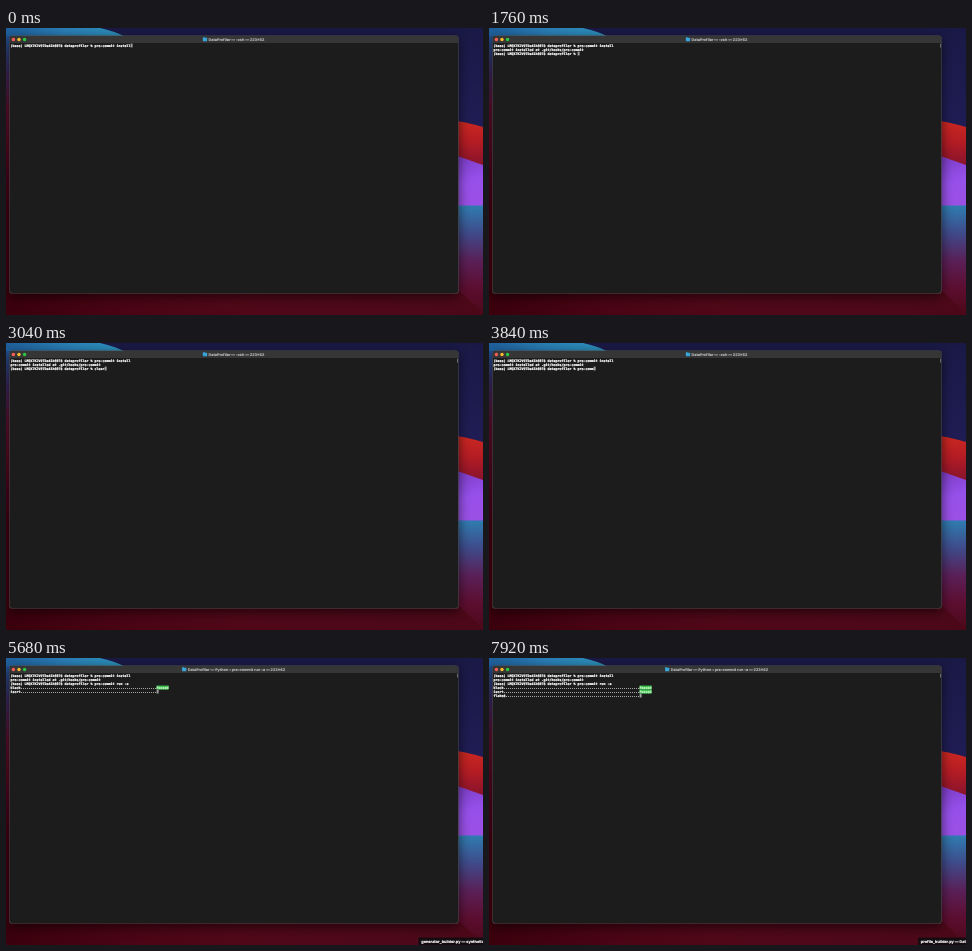
Animation, 477 px wide and 287 px high, one loop 8000 ms. Source, as an HTML page with a canvas:

```html
<!DOCTYPE html>
<html lang="en">
<head>
<meta charset="utf-8">
<title>Terminal</title>
<style>
html, body { margin: 0; width: 100%; height: 100%; overflow: hidden; background: #1c1a4a; }
canvas { display: block; width: 477px; height: 287px; }
</style>
</head>
<body>
<canvas id="stage" width="477" height="287"></canvas>
<script>
const ctx = document.getElementById('stage').getContext('2d');
const LOOP = 8000, COL = 2, ROW = 4.02, LEFT = 4.6, TOP = 15.5;
const PROMPT = '(base) LMQX7K2V9TDa41h6078 dataprofiler % ';
const MONO = 'bold 10px "DejaVu Sans Mono", monospace';
const SANS = '700 10px Inter, sans-serif';

function fade(x0, y0, x1, y1, ...colors) {
  const g = ctx.createLinearGradient(x0, y0, x1, y1);
  colors.forEach((c, i) => g.addColorStop(i / (colors.length - 1), c));
  return g;
}

function shape(path, fill) {
  ctx.fillStyle = fill;
  ctx.fill(new Path2D(path));
}

function box(x, y, w, h, r, fill) {
  ctx.fillStyle = fill;
  ctx.beginPath();
  ctx.roundRect(x, y, w, h, r);
  ctx.fill();
}

// Tiny type: set at 10px and scaled down so that advances stay fractional.
function text(str, x, y, size, font, fill, weight = 0) {
  ctx.save();
  ctx.translate(x, y);
  ctx.scale(size / 10, size / 10);
  ctx.font = font;
  ctx.textRendering = 'geometricPrecision';
  ctx.fillStyle = ctx.strokeStyle = fill;
  ctx.fillText(str, 0, 0);
  if (weight) {
    ctx.lineWidth = weight;
    ctx.strokeText(str, 0, 0);
  }
  ctx.restore();
}

const mono = (str, x, y, fill) => text(str, x, y + 3.2, 3.322, MONO, fill, .7);

function widthOf(str, size) {
  ctx.font = SANS;
  return ctx.measureText(str).width * size / 10;
}

function wallpaper() {
  box(0, 0, 477, 287, 0, fade(0, 0, 0, 110, '#1a1946', '#201d56'));
  shape('M0 0H94Q108 3 120 9V30H0Z', fade(0, 0, 120, 0, '#1f5f9c', '#2a80b8', '#2c93bc'));
  shape('M0 8H8V287H0Z', fade(0, 8, 0, 180, '#20508f', '#38265c', '#56102e', '#560a20', '#48041a', '#420012'));
  shape('M440 91Q460 94 477 99V150H440Z', fade(0, 92, 0, 136, '#cc2820', '#b41c24', '#8a142c'));
  shape('M440 124Q460 131 477 137V180H440Z', fade(452, 128, 470, 180, '#7a3cc4', '#9650ea', '#9c50e4'));
  shape('M440 177.5H477V287H440Z', fade(0, 178, 0, 287, '#2f7cb0', '#3f4a8a', '#5a2058', '#5c0e30', '#4c0818'));
  shape('M0 262H452Q466 274 477 287H0Z', fade(0, 0, 477, 0, '#3a000c', '#4a0414', '#500818', '#4e081a', '#4c0818'));
}

function windowFrame(title) {
  ctx.save();
  ctx.shadowColor = 'rgba(0,0,0,.6)';
  ctx.shadowBlur = 12;
  ctx.shadowOffsetY = 3;
  box(3.4, 7.6, 449.2, 258, 2.6, '#505050');
  ctx.restore();
  box(3.9, 8.1, 448.2, 257, 2.3, '#1c1c1c');
  box(3.9, 8.1, 448.2, 7, [2.3, 2.3, 0, 0], '#363636');
  ['#ff5f57', '#febc2e', '#28c840'].forEach((c, i) =>
    box(5.7 + i * 5.6, 9.8, 3.4, 3.4, 1.7, c));

  const size = 3.75, x = 230.4 - widthOf(title, size) / 2;
  box(x - 5.6, 9.2, 1.9, 1.5, .4, '#2b9fd6');
  box(x - 5.6, 9.7, 4.2, 3.5, .5, '#3aa5d8');
  text(title, x, 12.7, size, SANS, '#b8b8b8', .3);
}

const typed = (str, t, start, end) =>
  str.slice(0, Math.max(0, Math.round(str.length * Math.min(1, (t - start) / (end - start)))));

const hook = name => name.padEnd(73, '.');

function screenLines(t) {
  const lines = [PROMPT + 'pre-commit install'];
  if (t >= 560) lines.push('');
  if (t < 960) return lines;
  lines[1] = 'pre-commit installed at .git/hooks/pre-commit';

  let cmd = typed('clear', t, 2480, 2960);
  if (t >= 3200) cmd = 'clear'.slice(0, Math.max(0, 5 - Math.floor((t - 3200) / 60)));
  if (t >= 3520) cmd = typed('pre-commit run -a', t, 3520, 4200);
  lines.push(PROMPT + cmd);

  if (t >= 4320) lines.push('');
  if (t >= 4480) lines[3] = hook('black');
  if (t >= 5360) lines.push(hook('isort'));
  if (t >= 5920) lines.push(hook('flake8'));
  return lines;
}

function terminal(t) {
  const lines = screenLines(t);
  const last = lines.length - 1;
  if (last) box(451, 15.8, .7, 3.6, 0, '#909090');
  lines.forEach((line, i) => {
    const y = TOP + i * ROW;
    mono(line, LEFT, y, '#fff');
    if (i > 2 && i < last) {
      const x = LEFT + 73 * COL;
      box(x, y, 6 * COL, ROW, 0, '#3cc24c');
      mono('Passed', x, y, '#c4f4c8');
    }
  });
  box(LEFT + lines[last].length * COL, TOP + last * ROW + .1, COL, ROW - .2, 0, '#a0a0a0');
}

function pointer(t) {
  if (t < 4560 || t > 5000) return;
  const k = Math.max(0, (t - 4680) / 320) ** 2;
  const x = 427.5 + 18 * k, y = 145.5 + 145 * k;
  if (y > 265) return;
  ctx.lineWidth = .9;
  ctx.strokeStyle = '#f0f0f0';
  ctx.stroke(new Path2D(`M${x - 1.3} ${y - 2.6}h2.6m-1.3 0v5.2m-1.3 0h2.6`));
}

function dockLabel(t) {
  if (t < 5040) return;
  const [str, x] = t < 6000
    ? ['generator_builder.py — synthetic', 415.2]
    : ['profile_builder.py — DataProfiler', 431.8];
  box(x - 2.8, 279.4, 80, 9, 1.2, '#140c10');
  text(str, x, 284.7, 3.85, SANS, '#fff', .4);
}

function draw(now) {
  const t = now % LOOP;
  wallpaper();
  windowFrame(t < 4360
    ? 'DataProfiler — -zsh — 223×62'
    : 'DataProfiler — Python ‹ pre-commit run -a — 223×62');
  terminal(t);
  pointer(t);
  dockLabel(t);
}

const start = performance.now();
(function tick() {
  draw(performance.now() - start);
  requestAnimationFrame(tick);
})();
</script>
</body>
</html>
```
